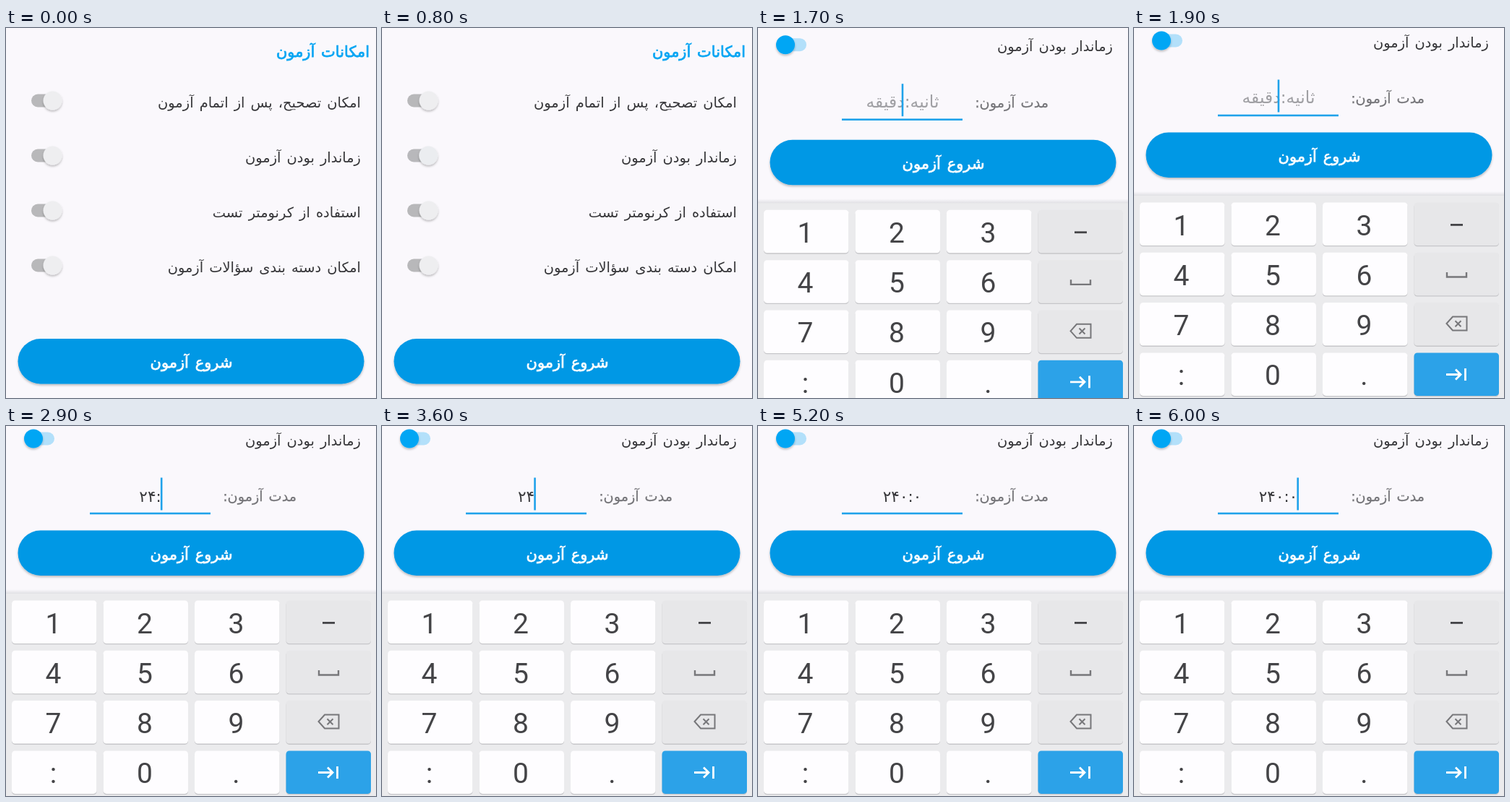
These frames come from a looping animation (512 px wide and 512 px high, 6100 ms). An HTML page:

```html
<!DOCTYPE html>
<html lang="fa">
<head>
<meta charset="utf-8">
<title>امکانات آزمون</title>
<style>
  html, body { margin: 0; width: 100%; height: 100%; overflow: hidden; background: #faf8fc; }
  svg { display: block; width: 100vw; height: 100vh; font: 20px "DejaVu Sans", sans-serif; }
  .fa { direction: rtl; fill: #353538; word-spacing: .1em; }
  .strong { font-size: 1.08em; stroke: currentColor; fill: currentColor; stroke-width: .75; }
  .key { font: 39px Roboto, sans-serif; fill: #444447; text-anchor: middle; }
  .icon { fill: none; stroke: #77777a; stroke-width: 2.4; }
</style>
</head>
<body>
<svg viewBox="0 0 512 512">
  <defs>
    <clipPath id="view"><rect id="viewBox" width="512" height="416"/></clipPath>
    <filter id="soft" x="-30%" y="-30%" width="160%" height="170%">
      <feDropShadow dx="0" dy="2" stdDeviation="1.6" flood-opacity=".25"/>
    </filter>
    <linearGradient id="edge" x2="0" y2="1">
      <stop stop-color="#dcdce0" stop-opacity="0"/>
      <stop offset="1" stop-color="#dcdce0"/>
    </linearGradient>
  </defs>
  <rect width="512" height="512" fill="#faf8fc"/>

  <g clip-path="url(#view)">
    <g id="list">
      <text class="fa strong" x="503" y="40" color="#06a5f3">امکانات آزمون</text>
      <g id="rows"></g>
      <g id="field">
        <text class="fa" x="402" y="263" style="fill:#747478;font-size:.99em;stroke:#747478;stroke-width:.25">مدت آزمون:</text>
        <text class="fa" id="hint" x="200" y="263" text-anchor="middle" style="fill:#a0a0a4;font-size:1.21em">ثانیه:دقیقه</text>
        <text id="value" x="199.5" y="263.500" text-anchor="middle" fill="#353538" font-size="21.5"></text>
        <rect id="line" x="116" width="167"/>
        <rect id="caret" y="230.5" width="2.6" height="45" fill="#1fa2ea"/>
      </g>
    </g>
  </g>

  <g id="start">
    <rect x="16.5" y="430" width="479" height="62.5" rx="31.25" fill="#0398e5" filter="url(#soft)"/>
    <text class="fa strong" x="256.5" y="470" text-anchor="middle" color="#fff">شروع آزمون</text>
  </g>

  <g id="keyboard">
    <rect y="226" width="512" height="7" fill="url(#edge)"/>
    <rect y="232" width="512" height="280" fill="#ebebed"/>
    <g id="keys"></g>
    <rect x="438" y="271" width="17" height="2.8" fill="#444447"/>
    <path class="icon" d="M433 338v6.5h27v-6.5"/>
    <path class="icon" style="stroke-width:2" d="M432.5 409l8.5-9.5h19.500v19h-19.500zM444.500 405.200l8 8m0-8l-8 8"/>
    <path class="icon" style="stroke:#fff;stroke-width:2.8" d="M432 479.500h20m-7-7l7 7l-7 7M458.500 471v17"/>
  </g>
</svg>
<script>
const LOOP = 6100;
const ROW_GAP = 76, FIELD_HEIGHT = 82, SCROLL = 159, LIFT = 285.5;
const FOCUS = 1500, EXPAND = 900;
const labels = [
  "امکان تصحیح، پس از اتمام آزمون",
  "زماندار بودن آزمون",
  "استفاده از کرنومتر تست",
  "امکان دسته بندی سؤالات آزمون"
];
const edits = [
  [FOCUS, ""], [2300, "۲"], [2600, "۲۴"], [2800, "۲۴:"],
  [3400, "۲۴"], [3700, "۲۴۰"], [4000, "۲۴۰:"], [4600, "۲۴۰:۰"]
];

const $ = id => document.getElementById(id);

function add(parent, tag, attrs, text = "") {
  const el = document.createElementNS("http://www.w3.org/2000/svg", tag);
  for (const name in attrs) el.setAttribute(name, attrs[name]);
  el.textContent = text;
  return parent.appendChild(el);
}

const rows = labels.map((label, i) => {
  const g = add($("rows"), "g", {});
  const y = 100.5 + i * ROW_GAP;
  const text = add(g, "text", { class: "fa", x: 491, y: y + 9 }, label);
  const track = add(g, "rect", { x: 35, y: y - 9, width: 32, height: 18, rx: 9, fill: "#b8b8ba" });
  const thumb = add(g, "circle", { cx: 64.5, cy: y, r: 13, fill: "#eeeef0", filter: "url(#soft)" });
  return { g, text, track, thumb };
});

// Body type size follows from the width of the longest label.
document.querySelector("svg").style.fontSize =
  20 * 281 / rows[0].text.getComputedTextLength() + "px";

["123", "456", "789", ":0."].forEach((chars, r) => {
  const y = 241.5 + r * 69.3;
  for (let c = 0; c < 4; c++) {
    const x = 8 + c * 126.5;
    const fill = c < 3 ? "#fefdff" : r < 3 ? "#e7e7e9" : "#2ca2e8";
    const box = { x, width: 117.5, height: 59.5, rx: 4.5 };
    add($("keys"), "rect", { ...box, y: y + 1.3, fill: "#c6c6c9" });
    add($("keys"), "rect", { ...box, y, fill });
    if (c < 3) add($("keys"), "text", { class: "key", x: x + 57.5, y: y + 45 }, chars[c]);
  }
});

const ease = (t, from, length) => {
  const p = Math.min(1, Math.max(0, (t - from) / length));
  return 1 - (1 - p) ** 3;
};
const mix = (a, b, p) => `rgb(${a.map((v, i) => Math.round(v + (b[i] - v) * p))})`;
const shift = (el, y) => el.setAttribute("transform", `translate(0 ${y})`);

function render(t) {
  const on = ease(t, 800, 250);
  const open = ease(t, FOCUS, 300);
  const expanded = t >= EXPAND;
  const focused = t >= FOCUS;

  const { track, thumb } = rows[1];
  thumb.setAttribute("cx", 64.5 - 26.5 * on);
  thumb.setAttribute("fill", mix([238, 238, 240], [3, 166, 244], on));
  track.setAttribute("fill", mix([184, 184, 186], [179, 224, 250], on));
  rows.forEach(({ g }, i) => shift(g, expanded && i > 1 ? FIELD_HEIGHT : 0));

  shift($("list"), -SCROLL * open);
  shift($("start"), -LIFT * open);
  shift($("keyboard"), 288 * (1 - open));
  $("viewBox").setAttribute("height", 416 - LIFT * open);

  const [since, text] = edits.findLast(([at]) => at <= t) || [0, ""];
  const value = $("value");
  if (value.textContent !== text) value.textContent = text;
  $("field").style.display = expanded ? "" : "none";
  $("hint").style.display = text ? "none" : "";

  const line = $("line");
  line.setAttribute("y", focused ? 278.7 : 278.3);
  line.setAttribute("height", focused ? 2.6 : 1.3);
  line.setAttribute("fill", focused ? "#1fa2ea" : "#88888b");

  const caretOn = focused && Math.floor((t - since) / 500) % 2 === 0;
  $("caret").style.display = caretOn ? "" : "none";
  const half = text ? value.getComputedTextLength() / 2 : 0;
  $("caret").setAttribute("x", 198.7 + half);
}

function tick() {
  render(performance.now() % LOOP);
  requestAnimationFrame(tick);
}
tick();
</script>
</body>
</html>
```
